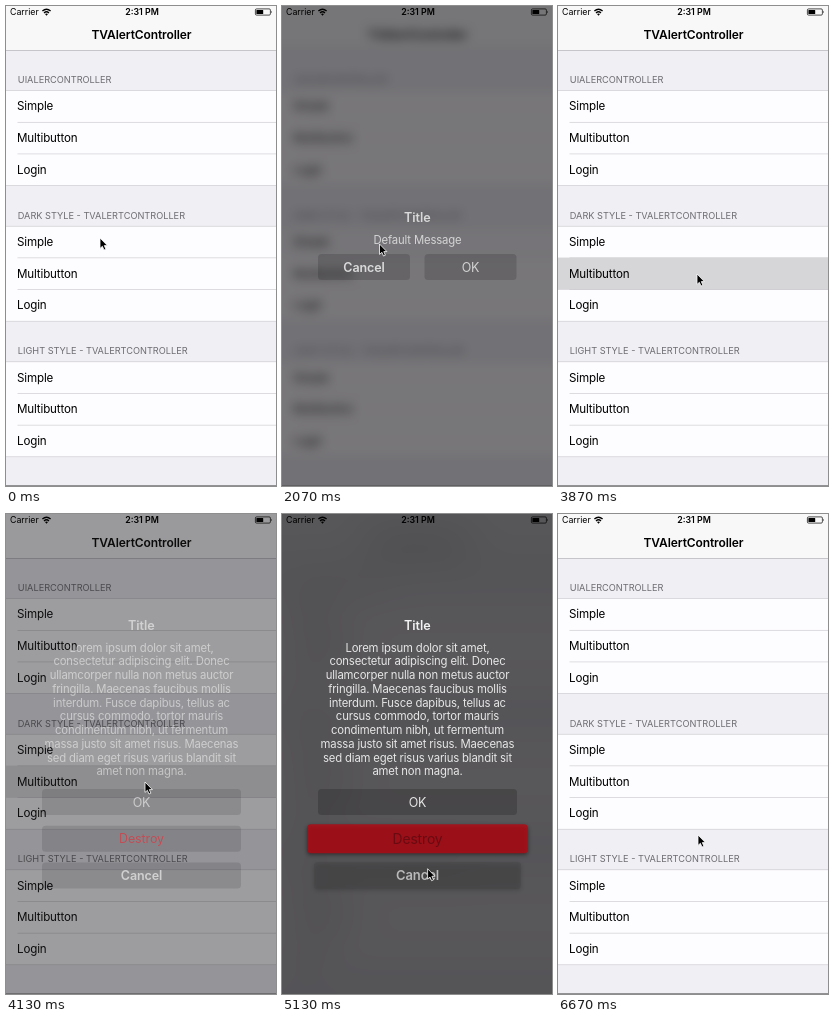
Recreate the animation shown at these times as an HTML page. Size 270x480 px, loop 6740 ms.

```html
<!DOCTYPE html>
<html lang="en">
<head>
<meta charset="utf-8">
<title>TVAlertController</title>
<style>
html, body { margin: 0; width: 100%; height: 100%; overflow: hidden; background: #efeff4; }
svg { display: block; width: 100vw; height: 100vh; font-family: Inter, "Liberation Sans", sans-serif; }
.mid { text-anchor: middle; }
.bold { font-weight: 600; }
.row { font-size: 11.6px; letter-spacing: -.15px; }
.head { font-size: 9.2px; fill: #6d6d72; }
.nav { font-size: 12px; letter-spacing: -.1px; }
.msg { font-size: 11.3px; letter-spacing: -.15px; fill: #fff; fill-opacity: .86; }
.title { font-size: 12.6px; fill: #fff; fill-opacity: .92; }
.btn { font-size: 12.5px; letter-spacing: -.1px; }
.bar { font-size: 8.8px; }
.shadow { filter: blur(2px); }
</style>
</head>
<body>
<svg id="stage" viewBox="0 0 270 480" preserveAspectRatio="none">
  <defs>
    <filter id="blur" filterUnits="userSpaceOnUse" x="-60" y="-60" width="390" height="600" color-interpolation-filters="sRGB">
      <feGaussianBlur id="soft" stdDeviation="0"/>
    </filter>
  </defs>
  <g id="page"></g>
  <rect id="dim" width="270" height="480" fill="#1c1b1e"/>
  <g id="alerts"></g>
  <g id="status">
    <text class="bar" x="4" y="9.1">Carrier</text>
    <g fill="none" stroke="#000" stroke-width="1.3">
      <path d="M36.4 5.1Q40.5 1.3 44.6 5.1"/>
      <path d="M38 6.9Q40.5 4.6 43 6.9"/>
    </g>
    <path d="M39 8.1Q40.5 6.9 42 8.1L40.5 9.7Z"/>
    <text class="bar bold mid" x="136" y="9.1">2:31 PM</text>
    <rect x="249.4" y="2.9" width="15" height="6.2" rx="1.2" fill="none" stroke="#000" stroke-width=".7"/>
    <rect x="250.4" y="3.9" width="6.8" height="4.2" rx=".4"/>
    <path d="M265.2 4.8Q266.6 6 265.2 7.2Z"/>
  </g>
  <rect y="479.4" width="270" height=".6" fill="#555"/>
  <path id="cursor" d="M0 0V10.4L2.4 8.3L4 12L5.9 11.2L4.3 7.6H7.4Z" fill="#000" stroke="#fff" stroke-width=".8" stroke-linejoin="round"/>
</svg>
<script>
const LOOP = 6740;
const NS = "http://www.w3.org/2000/svg";
const $ = id => document.getElementById(id);

function add(parent, tag, attrs, text) {
  const el = document.createElementNS(NS, tag);
  for (const k in attrs) el.setAttribute(k, attrs[k]);
  if (text) el.textContent = text;
  return parent.appendChild(el);
}

const clamp = x => Math.max(0, Math.min(1, x));
const span = (t, a, b) => clamp((t - a) / (b - a));
const smooth = x => x * x * (3 - 2 * x);
const mix = (a, b, k) => a + (b - a) * k;
const blend = (a, b, k) => `rgba(${a.map((v, i) => mix(v, b[i], k).toFixed(3)).join()})`;

// Table view
const page = $("page");
const wide = (y, h, fill, x = -60) => add(page, "rect", { x, y, width: 330 - x, height: h, fill });
const ROW = 31.67;
const rows = [];
wide(-60, 600, "#efeff4");
["UIALERCONTROLLER", "DARK STYLE - TVALERTCONTROLLER", "LIGHT STYLE - TVALERTCONTROLLER"].forEach((name, g) => {
  const top = 84.6 + g * 135.6;
  add(page, "text", { x: 11.8, y: top - 7.4, class: "head" }, name);
  wide(top, ROW * 3, "#fdfcfe");
  ["Simple", "Multibutton", "Login"].forEach((label, i) => {
    const y = top + i * ROW;
    if (i) wide(y - .3, .6, "#c8c7cc", 11.5);
    const lit = wide(y - .3, ROW + .6, "#d6d5d8");
    lit.setAttribute("opacity", 0);
    rows.push(lit);
    add(page, "text", { x: 11, y: y + 19.7, class: "row" }, label);
  });
  wide(top - .3, .6, "#c8c7cc");
  wide(top + ROW * 3 - .3, .6, "#c8c7cc");
});
wide(-60, 104.3, "#f8f8f9");
wide(44.2, .6, "#a9a9ad");
add(page, "text", { x: 135.5, y: 33.2, class: "nav bold mid" }, "TVAlertController");

// Alerts
function makeButton(g, label, x, y, w, kind) {
  const h = 26;
  const el = add(g, "g", {});
  const box = { x: -w / 2, y: -h / 2, width: w, height: h, rx: 3.5 };
  return {
    el, kind,
    cx: x + w / 2, cy: y + h / 2,
    shadow: add(el, "rect", { ...box, y: 1.5 - h / 2, class: "shadow" }),
    box: add(el, "rect", box),
    text: add(el, "text", { y: 4.5, class: "btn mid" + (kind === "cancel" ? " bold" : "") }, label)
  };
}

function makeAlert(titleY, lines, lineY, buttons) {
  const g = add($("alerts"), "g", {});
  add(g, "text", { x: 135.3, y: titleY, class: "title bold mid" }, "Title");
  lines.forEach((s, i) => add(g, "text", { x: 135.5, y: lineY + i * 13.77, class: "msg mid" }, s));
  return { g, buttons: buttons.map(b => makeButton(g, ...b)) };
}

const simple = makeAlert(216.3, ["Default Message"], 237.7, [
  ["Cancel", 36, 248, 92, "cancel"],
  ["OK", 142.5, 248, 92, "plain"]
]);
const multi = makeAlert(116, [
  "Lorem ipsum dolor sit amet,",
  "consectetur adipiscing elit. Donec",
  "ullamcorper nulla non metus auctor",
  "fringilla. Maecenas faucibus mollis",
  "interdum. Fusce dapibus, tellus ac",
  "cursus commodo, tortor mauris",
  "condimentum nibh, ut fermentum",
  "massa justo sit amet risus. Maecenas",
  "sed diam eget risus varius blandit sit",
  "amet non magna."
], 137.5, [
  ["OK", 36, 275, 199, "plain"],
  ["Destroy", 36, 311.7, 199, "destroy"],
  ["Cancel", 36, 348.4, 199, "cancel"]
]);

const IDLE = [0, 0, 0, .19];
const LOOK = {
  plain: { fill: [255, 255, 255, .97], ink: [[255, 255, 255, .86], [20, 20, 22, 1]] },
  cancel: { fill: [255, 255, 255, .97], ink: [[255, 255, 255, .92], [20, 20, 22, 1]] },
  destroy: { fill: [253, 10, 26, 1], ink: [[226, 24, 36, 1], [62, 6, 12, 1]] }
};

function drawButton(b, k) {
  const look = LOOK[b.kind];
  b.el.setAttribute("transform", `translate(${b.cx} ${b.cy}) scale(${1 + .15 * k})`);
  b.box.setAttribute("fill", blend(IDLE, look.fill, k));
  b.text.setAttribute("fill", blend(look.ink[0], look.ink[1], k));
  b.shadow.setAttribute("opacity", .6 * k);
}

// Timeline
const fade = (t, start, end, len) => t < end
  ? 1 - Math.pow(1 - span(t, start, start + 650), 1.7)
  : 1 - smooth(span(t, end, end + len));
const focus = (t, on, off = LOOP) => smooth(span(t, on, on + 150)) * (1 - smooth(span(t, off, off + 150)));
const flash = (t, on, off) => t < on ? 0 : 1 - span(t, off, off + 250);

const PATH = [
  [0, 94, 232], [1020, 94, 232], [1330, 97.5, 238], [2150, 97.5, 238],
  [2720, 188, 262], [2870, 188, 262], [3540, 146, 270], [3670, 139, 268],
  [4550, 139, 268], [5230, 146, 360], [5300, 146, 360], [5850, 148, 320],
  [6070, 148, 320], [6640, 140, 321], [LOOP, 140, 321]
];

function cursorAt(t) {
  const i = PATH.findIndex(p => p[0] > t);
  const a = PATH[i - 1], b = PATH[i];
  const k = smooth(span(t, a[0], b[0]));
  return [mix(a[1], b[1], k), mix(a[2], b[2], k)];
}

function render(t) {
  const p1 = fade(t, 1670, 2820, 640);
  const p2 = fade(t, 3872, 6020, 640);
  const p = Math.max(p1, p2);

  rows[3].setAttribute("opacity", flash(t, 1470, 1850));
  rows[4].setAttribute("opacity", flash(t, 3870, 4050));

  const sd = 20 * Math.pow(p, 6);
  $("soft").setAttribute("stdDeviation", sd.toFixed(2));
  if (sd > .05) page.setAttribute("filter", "url(#blur)");
  else page.removeAttribute("filter");
  $("dim").setAttribute("opacity", .73 * p);

  simple.g.setAttribute("opacity", p1);
  multi.g.setAttribute("opacity", p2);
  drawButton(simple.buttons[0], 0);
  drawButton(simple.buttons[1], focus(t, 2460));
  drawButton(multi.buttons[0], focus(t, 4680, 4880));
  drawButton(multi.buttons[1], Math.max(focus(t, 4880, 5080), focus(t, 5560)));
  drawButton(multi.buttons[2], focus(t, 5080, 5560));

  $("cursor").setAttribute("transform", `translate(${cursorAt(t)})`);
}

const t0 = performance.now();
function tick() {
  render((performance.now() - t0) % LOOP);
  requestAnimationFrame(tick);
}
tick();
</script>
</body>
</html>
```
